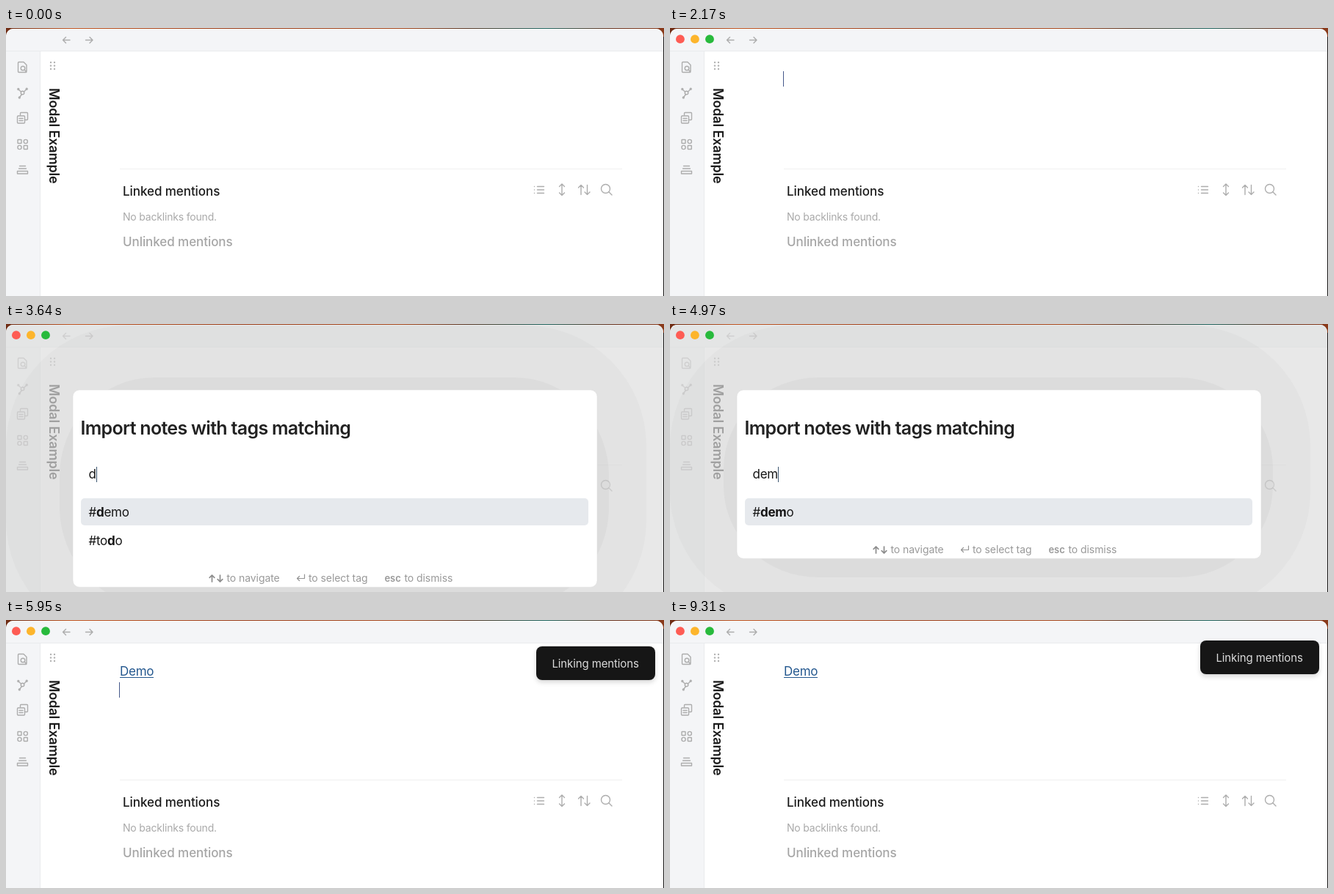
These frames come from a looping animation (896 by 366 pixels, 9.38 s). An HTML page:

```html
<!DOCTYPE html>
<html lang="en">
<head>
<meta charset="utf-8">
<title>Modal Example</title>
<style>
  html, body { margin: 0; width: 100%; height: 100%; overflow: hidden; background: #fff; }
  svg { display: block; width: 896px; height: 366px; }
  text { font-family: Inter, Roboto, "Liberation Sans", sans-serif; white-space: pre; }
  .body { font-size: 17px; letter-spacing: -.27px; fill: #161616; }
  .head { font-size: 17px; letter-spacing: -.07px; font-weight: 500; fill: #1c1c1c; }
  .small { font-size: 14px; letter-spacing: -.19px; fill: #a9a9a9; }
  .hint { letter-spacing: -.08px; fill: #999; }
  .key { font-size: 13px; font-weight: 600; }
  .title { font-size: 18px; letter-spacing: -.16px; font-weight: 600; fill: #1c1c1c; }
  .big { font-size: 25px; letter-spacing: -.7px; font-weight: 600; fill: #222; }
  .toast { font-size: 15px; letter-spacing: -.12px; fill: #dcdcdc; }
  .b { font-weight: 700; }
  .line { fill: none; stroke: #adadad; stroke-width: 1.4; stroke-linecap: round; stroke-linejoin: round; }
  .dots { fill: #b4b4b4; }
</style>
</head>
<body>
<svg viewBox="0 0 896 366" xmlns="http://www.w3.org/2000/svg">
  <defs>
    <linearGradient id="wall">
      <stop offset="0" stop-color="#6e2c14"/>
      <stop offset=".1" stop-color="#c05420"/>
      <stop offset=".35" stop-color="#9a3c18"/>
      <stop offset=".6" stop-color="#a8481c"/>
      <stop offset=".7" stop-color="#5a3826"/>
      <stop offset=".82" stop-color="#1f6660"/>
      <stop offset=".92" stop-color="#6a3420"/>
      <stop offset="1" stop-color="#8a3a1a"/>
    </linearGradient>
    <clipPath id="win"><path d="M0 366V11a10 10 0 0 1 10-10H885a10 10 0 0 1 10 10V366z"/></clipPath>
    <filter id="soft" x="-20%" y="-40%" width="140%" height="200%">
      <feDropShadow dx="0" dy="3" stdDeviation="3" flood-opacity=".16"/>
    </filter>
  </defs>

  <rect width="896" height="366" fill="#1c1a1a"/>
  <rect width="896" height="12" fill="url(#wall)"/>

  <g clip-path="url(#win)">
    <rect width="895" height="366" fill="#fff"/>
    <rect width="895" height="31" fill="#f4f5f7"/>
    <rect y="31" width="46" height="335" fill="#f4f5f7"/>
    <path d="M0 31.5H895M46.5 31V366" stroke="#e9ebed" fill="none"/>

    <g class="line">
      <path d="M87 16.5H77.5m4-4l-4 4 4 4M108.500 16.500H118m-4-4l4 4-4 4"/>
      <!-- sidebar -->
      <path d="M27.500 60.500H17.500a1 1 0 0 1-1-1V47.500a1 1 0 0 1 1-1H24l4 4V59M25.500 57.500l2.500 2.500"/>
      <circle cx="23" cy="55" r="2.800"/>
      <circle cx="22.500" cy="88.500" r="2.300"/>
      <path d="M20.500 87l-3-2.500M24.500 87l3-3M21.500 90.500l-2.500 3.500"/>
      <circle cx="16.800" cy="83.500" r="1"/><circle cx="28.200" cy="83.200" r="1"/><circle cx="18.300" cy="95" r="1"/>
      <path d="M19.500 119v-2.500a1 1 0 0 1 1-1h8a1 1 0 0 1 1 1v8a1 1 0 0 1-1 1h-3"/>
      <rect x="15.500" y="120" width="10" height="10" rx="1"/>
      <path d="M18 123.500h5M18 126.500h5"/>
      <rect x="16" y="152.500" width="5" height="5" rx=".6"/>
      <circle cx="26.800" cy="155" r="2.600"/>
      <circle cx="18.500" cy="163" r="2.600"/>
      <rect x="24.300" y="160.500" width="5" height="5" rx=".6"/>
      <path d="M18.500 188.500h8M17.500 192h10M15.500 195.500v3.500h14v-3.500z"/>
    </g>
    <g class="dots" id="grip"></g>
    <text class="title" transform="translate(59 82) rotate(90)">Modal Example</text>

    <g id="links">
      <path d="M155 192.500H839" stroke="#f0f0f0"/>
      <text class="head" x="159" y="229">Linked mentions</text>
      <text class="small" x="159" y="263">No backlinks found.</text>
      <text class="head" x="159" y="298" style="fill:#a6a6a6">Unlinked mentions</text>
      <g class="line">
        <path d="M723.500 216.500h9M723.500 221h9M723.500 225.500h9M719.500 216.500h.1M719.500 221h.1M719.500 225.500h.1"/>
        <path d="M757 213.500v15m-3.500-12l3.500-3.500 3.500 3.500m-7 8.500l3.500 3.500 3.500-3.500"/>
        <path d="M783 227.500v-13m-3.500 3.500l3.500-3.500 3.500 3.500M791.500 214.500v13m-3.500-3.500l3.500 3.500 3.500-3.500"/>
        <circle cx="816.500" cy="219.500" r="6"/><path d="M821 224l4 4"/>
      </g>
    </g>

    <g id="note">
      <text class="body" x="155" y="76" style="fill:#24588f">Demo</text>
      <path d="M155 78.500H201" stroke="#24588f"/>
    </g>
    <rect id="caret" x="154" y="59" width="1" height="21" fill="#44588a"/>

    <g id="toast">
      <rect x="722" y="36" width="162" height="46" rx="8" fill="#171717" filter="url(#soft)"/>
      <text class="toast" x="743.500" y="65">Linking mentions</text>
    </g>

    <g id="modal">
      <rect width="895" height="366" fill="#dedede" opacity=".7"/>
      <rect id="outer" x="0" y="2" width="872" rx="165" opacity=".022"/>
      <rect id="inner" x="73" y="73" width="748" rx="128" opacity=".03"/>
      <rect id="box" x="91" y="90" width="714" rx="9" fill="#fff" stroke="#d8d8d8" stroke-width=".5"/>
      <text class="big" x="101.500" y="151">Import notes with tags matching</text>
      <text class="body" id="query" x="112.500" y="211"></text>
      <rect id="bar" y="195" width="1" height="21"/>
      <rect id="pick" x="102" y="238" width="691" height="37" rx="5" fill="#e6e9ed"/>
      <text class="body" id="first" x="112.500" y="263">#<tspan class="b"></tspan><tspan></tspan></text>
      <text class="body" id="second" x="112.500" y="302">#to<tspan class="b">d</tspan>o</text>
      <g id="hints">
        <path class="line" style="stroke:#8c8c8c;stroke-width:1.700" d="M280.500 265v-9m-3.300 3.300l3.300-3.300 3.300 3.300M291.500 256v9m-3.300-3.300l3.300 3.300 3.300-3.300"/>
        <path class="line" style="stroke:#949494;stroke-width:1.200" d="M406.500 255v5.500H396.500m3-3l-3 3 3 3"/>
        <text class="small hint" x="300.500" y="265">to navigate</text>
        <text class="small hint" x="412" y="265">to select tag</text>
        <text class="small hint key" x="515.500" y="265">esc</text>
        <text class="small hint" x="542.500" y="265">to dismiss</text>
      </g>
    </g>

    <g id="lights">
      <circle cx="13.900" cy="15.200" r="5.900" fill="#fe5c54"/>
      <circle cx="33.900" cy="15.200" r="5.900" fill="#fdb52c"/>
      <circle cx="54" cy="15.200" r="5.900" fill="#28ba3c"/>
    </g>
  </g>
</svg>
<script>
const LOOP = 9380, STEP = 70;
const OPEN = 2800, CLOSE = 5110, TOAST = 5180, LEAVE = 9310;
const $ = id => document.getElementById(id);
const show = (id, on) => $(id).setAttribute('visibility', on ? 'inherit' : 'hidden');
const set = (id, name, value) => $(id).setAttribute(name, value);
const clamp = v => Math.max(0, Math.min(1, v));

for (let i = 0; i < 6; i++) {
  const dot = document.createElementNS('http://www.w3.org/2000/svg', 'circle');
  dot.setAttribute('cx', 61 + 5 * (i % 2));
  dot.setAttribute('cy', 47 + 4.5 * (i >> 1));
  dot.setAttribute('r', 1.2);
  $('grip').append(dot);
}

// [start, typed text, modal bottom, caret x]
const typing = [
  [OPEN, '', 272, 113],
  [3640, 'd', 359, 123],
  [3850, 'de', 320, 133],
  [3920, 'dem', 320, 147]
];

// editor caret toggles every 630 ms, starting visible before 280 ms
const blink = t => Math.floor((t - 280 + 630) / 630) % 2 === 0;

function drawModal(t) {
  const [, typed, bottom, x] = typing.filter(row => t >= row[0]).pop();
  const grow = bottom - 272;
  set('box', 'height', bottom - 89.6);
  set('inner', 'height', bottom - 47);
  set('inner', 'ry', 113 + grow / 4);
  set('outer', 'height', bottom + 72);
  $('query').textContent = typed || 'Type the name of a tag...';
  $('query').style.fill = typed ? '#161616' : '#a3a3a3';
  set('bar', 'x', x);
  set('bar', 'fill', typed ? '#3c5670' : '#3b78b5');
  show('bar', !(t >= 3290 && t < 3640) && !(t >= 4480 && t < 4970));
  show('pick', typed);
  show('first', typed);
  show('second', typed === 'd');
  const [hit, rest] = $('first').children;
  hit.textContent = typed;
  rest.textContent = 'demo'.slice(typed.length);
  set('hints', 'transform', `translate(0 ${grow})`);
}

function draw(now) {
  const t = Math.floor((now % LOOP) / STEP) * STEP;
  const open = t >= OPEN && t < CLOSE;
  const done = t >= CLOSE;

  set('lights', 'opacity', clamp(t / 210));
  show('modal', open);
  if (open) drawModal(t);

  show('note', done);
  set('links', 'transform', `translate(0 ${done ? 26 : 0})`);
  set('caret', 'y', done ? 85 : 59);
  show('caret', t >= 140 && !open && blink(t));

  const enter = clamp((t - TOAST + STEP) / 210);
  show('toast', t >= TOAST);
  set('toast', 'opacity', enter);
  set('toast', 'transform', `translate(0 ${t >= LEAVE ? -8 : -8 * (1 - enter) ** 2})`);
}

const start = performance.now();
function tick() {
  draw(performance.now() - start);
  requestAnimationFrame(tick);
}
tick();
</script>
</body>
</html>
```
